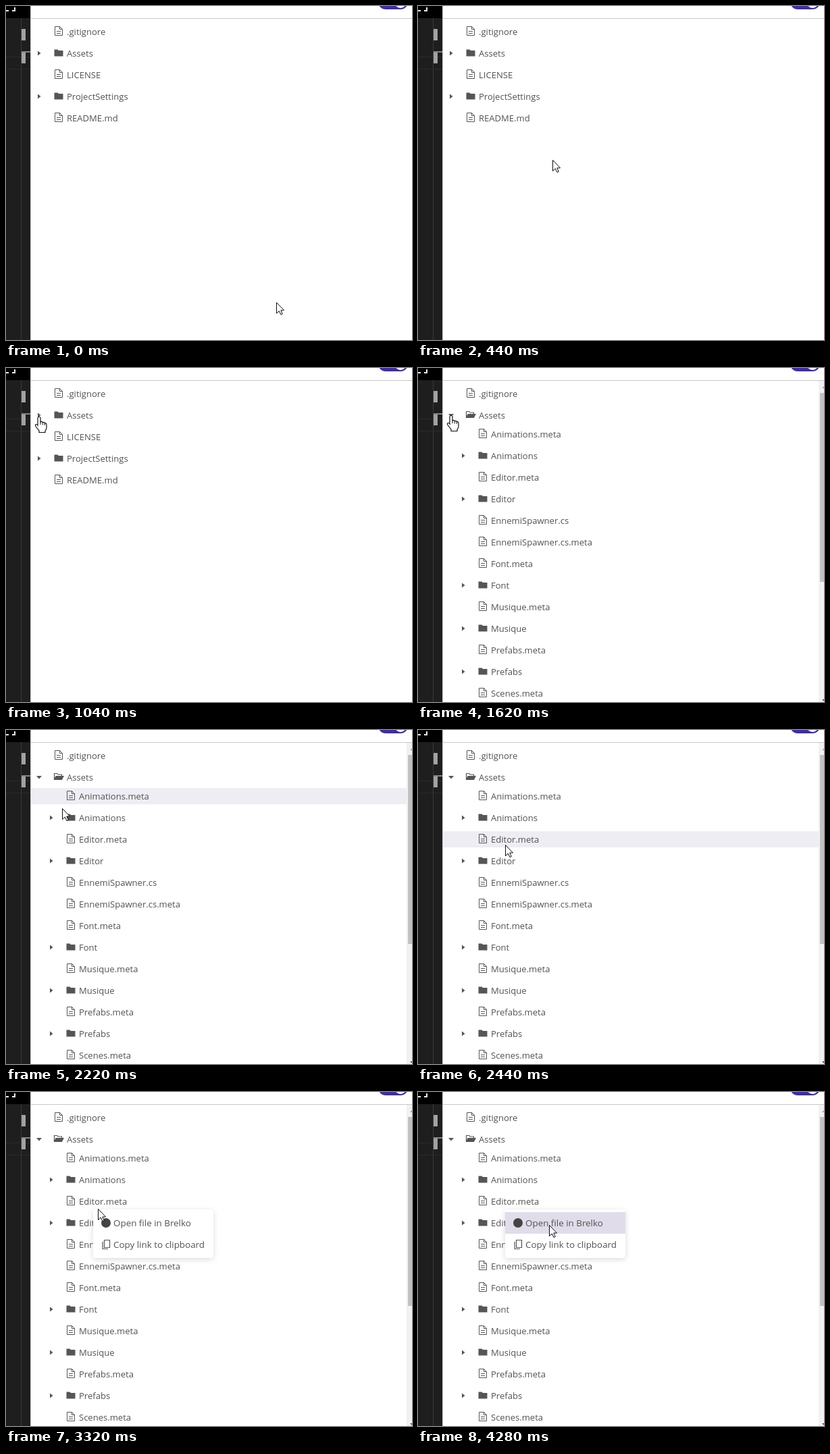
Animation, 601 px wide and 495 px high, one loop 4370 ms. Source, as an HTML page with a canvas:

```html
<!DOCTYPE html>
<html lang="en">
<head>
<meta charset="utf-8">
<title>File tree</title>
<style>
  html, body { margin: 0; width: 100%; height: 100%; overflow: hidden; background: #fff; }
  canvas { display: block; }
</style>
</head>
<body>
<canvas id="stage" width="601" height="495"></canvas>
<script>
const ctx = document.getElementById('stage').getContext('2d');
const LOOP = 4370;
const INK = '#525252', ICON = '#555';
const HOVER = '#eeedf4', ACTIVE = '#e1dcea';
const TREE_SIZE = 13.05, MENU_SIZE = 13.4;

const ROOT_REST = [['LICENSE', 102], ['ProjectSettings', 134, true], ['README.md', 166]];
const CHILDREN = [
  ['Animations.meta'], ['Animations', true], ['Editor.meta'], ['Editor', true],
  ['EnnemiSpawner.cs'], ['EnnemiSpawner.cs.meta'], ['Font.meta'], ['Font', true],
  ['Musique.meta'], ['Musique', true], ['Prefabs.meta'], ['Prefabs', true], ['Scenes.meta']
];

// Pointer moves: start, end, number of steps, target x and y.
const MOVES = [
  [80, 600, 8, 106, 130],
  [680, 900, 4, 49, 74],
  [1040, 1040, 1, 49, 72],
  [1120, 1120, 1, 49, 70],
  [2080, 2220, 3, 83, 116],
  [2290, 2360, 2, 120, 365],
  [2440, 2440, 1, 129, 170],
  [3320, 3320, 1, 136, 173],
  [3380, 3620, 4, 194, 197]
];
const CLICKS = [[1260, 1400], [2660, 2800], [4220, 4280]];

const clamp = v => Math.max(0, Math.min(1, v));
const ramp = (t, a, b) => clamp((t - a) / (b - a));
const within = (t, a, b) => t >= a && t < b;
const easeInOut = p => p * p * (3 - 2 * p);

function rect(x, y, w, h, color) {
  ctx.fillStyle = color;
  ctx.fillRect(x, y, w, h);
}

function disc(x, y, r, color) {
  ctx.fillStyle = color;
  ctx.beginPath();
  ctx.arc(x, y, r, 0, 7);
  ctx.fill();
}

function roundRect(x, y, w, h, r, color) {
  ctx.fillStyle = color;
  ctx.beginPath();
  ctx.roundRect(x, y, w, h, r);
  ctx.fill();
}

function polygon(points, color) {
  ctx.beginPath();
  points.forEach(([x, y]) => ctx.lineTo(x, y));
  ctx.closePath();
  ctx.fillStyle = color;
  ctx.fill();
}

function shape(path, x, y, fill, stroke, width = 1) {
  ctx.save();
  ctx.translate(x, y);
  const p = new Path2D(path);
  if (fill) { ctx.fillStyle = fill; ctx.fill(p); }
  if (stroke) { ctx.strokeStyle = stroke; ctx.lineWidth = width; ctx.stroke(p); }
  ctx.restore();
}

function label(text, x, y, size = TREE_SIZE) {
  ctx.font = `${size}px "Open Sans", "Noto Sans", sans-serif`;
  ctx.fillStyle = INK;
  ctx.fillText(text, x, y + 5);
}

function faded(alpha, draw) {
  if (alpha <= 0) return;
  ctx.save();
  ctx.globalAlpha *= alpha;
  draw();
  ctx.restore();
}

function bar(y, color, alpha, right = 601) {
  faded(alpha, () => rect(37, y - 12, right - 37, 24, color));
}

function fileIcon(x, y) {
  shape('M.5 -6.5H7.5L11.5 -2.5V6.5H.5ZM7.5 -6.5V-2.5H11.5M3 .5H9M3 3.5H9', x, y, null, ICON);
}

function folderIcon(x, y, open) {
  if (open) {
    shape('M.5 4.5V-4.5H4.5L6 -3H11.5V-.5M.5 4.5L3 -.5H14L11.5 4.5Z', x - 1, y, null, ICON, 1.2);
    shape('M.5 4.5L3 -.5H14L11.5 4.5Z', x - 1, y, ICON);
  } else {
    shape('M-.5 -4.5H4.5L6 -3H12.5V5.5H-.5Z', x, y, ICON);
  }
}

function caret(x, y, open) {
  polygon(open ? [[x - 4, y - 2], [x + 4, y - 2], [x, y + 2.5]]
               : [[x - 2, y - 3.5], [x + 2.5, y], [x - 2, y + 3.5]], ICON);
}

function row(name, x, y, folder, open, caretOpen = open) {
  if (folder) {
    caret(x - 23, y, caretOpen);
    folderIcon(x, y - 1, open);
  } else {
    fileIcon(x, y - 1);
  }
  label(name, x + 18, y);
}

function editorStrip() {
  rect(0, 0, 36, 495, '#1e1e1e');
  rect(0, 0, 36, 18, '#000');
  rect(22, 18, 1, 477, '#3a3a3a');
  rect(0, 75, 36, 1, '#2b2b2b');
  rect(0, 93, 36, 1, '#2b2b2b');
  rect(23, 34, 6, 17, '#a2a2a2');
  rect(23, 67, 6, 18, '#a2a2a2');
  rect(23, 67, 13, 2, '#858585');
  rect(36, 0, 1, 495, '#c8c8c8');
  rect(0, 6, 4, 2, '#eee');
  rect(9, 6, 5, 2, '#eee');
  rect(12, 2, 2, 6, '#eee');
}

function header() {
  rect(37, 18, 564, 1, '#c8c8c8');
  roundRect(551, -17, 44, 22, 11, '#3f2da5');
  disc(584, -6, 9, '#fff');
}

function scrollbar() {
  rect(593, 19, 8, 476, '#f1f1f1');
  rect(595, 37, 6, 280, '#c1c1c1');
  polygon([[598, 30], [601, 27], [601, 30]], '#a3a3a3');
  polygon([[598, 491], [601, 491], [601, 494]], '#505050');
}

function tree(t) {
  const expanded = t >= 1480;
  if (!expanded) {
    bar(134, '#fbfbfd', within(t, 600, 760) ? 1 : 0);
    bar(102, '#fbfbfd', within(t, 760, 900) ? 1 : 0);
  } else {
    bar(98, HOVER, within(t, 2160, 2300) ? 1 : 0, 593);
    bar(162, HOVER, within(t, 2440, 2800) ? 1 : 0, 593);
    bar(162, ACTIVE, t < 2800 ? 0 : t < 2880 ? 1 : t < 2960 ? .45 : 0, 593);
  }
  row('.gitignore', 72, 38);
  row('Assets', 72, 70, true, expanded, t >= 1580);
  if (!expanded) {
    ROOT_REST.forEach(([name, y, folder]) => row(name, 72, y, folder));
    return;
  }
  faded(t < 1580 ? 0 : t < 1620 ? .5 : 1, () =>
    CHILDREN.forEach(([name, folder], i) => row(name, 90, 98 + 32 * i, folder)));
  if (t >= 1580) scrollbar();
}

function menu(t) {
  if (t < 2800) return;
  const [alpha, scaleY] = t < 2880 ? [.25, .875] : t < 2960 ? [.75, .96] : [1, 1];
  faded(alpha, () => {
    ctx.translate(129, 174);
    ctx.scale(1, scaleY);
    ctx.save();
    ctx.shadowColor = 'rgba(0,0,0,.15)';
    ctx.shadowBlur = 8;
    ctx.shadowOffsetY = 2;
    roundRect(0, 0, 178, 72, 4, '#fff');
    ctx.restore();
    faded(ramp(t, 3400, 3700), () => rect(0, 4, 178, 32, ACTIVE));
    disc(19, 20, 7, '#444');
    label('Open file in Brelko', 30, 20, MENU_SIZE);
    shape('M3.5 -6.5H11.5V4.5H3.5ZM1 -4V6.5H9', 13, 52, null, ICON, 1.2);
    label('Copy link to clipboard', 30, 52, MENU_SIZE);
  });
}

function pointerAt(t) {
  let x = 400, y = 439;
  for (const [start, end, steps, toX, toY] of MOVES) {
    if (t < start) break;
    const done = end > start ? Math.floor(ramp(t, start, end) * (steps - 1) + 1.001) / steps : 1;
    const p = easeInOut(done);
    x += (toX - x) * p;
    y += (toY - y) * p;
  }
  return [Math.round(x), Math.round(y)];
}

function pointer(t) {
  const [x, y] = pointerAt(t);
  if (CLICKS.some(([a, b]) => within(t, a, b))) disc(x, y, 12, 'rgba(255,255,0,.47)');
  const hand = within(t, 600, 2080) || (within(t, 3380, 4280) && y >= 178);
  if (hand) {
    shape('M-2 13V2Q-2 .5 0 .5T2 2V8Q4 6.5 5.3 8.8Q7.3 7.5 8.3 9.8Q11 9 11 12V16Q11 19 9 21V23.5H0V21L-5 14.5Q-6.5 11.5 -4 11.5Q-3 11.5 -2 13Z', x, y, '#fff', '#111', 1.2);
    shape('M2 8V12M5.3 9V12.5M8.3 10V13', x, y, null, '#111');
  } else {
    shape('M.5 .5V16.5L4.3 13L7 18.5L9.3 17.5L6.8 12H11.5Z', x, y, '#fff', '#0c0c14');
  }
}

function frame(now) {
  const t = now % LOOP;
  rect(0, 0, 601, 495, '#fff');
  tree(t);
  header();
  editorStrip();
  menu(t);
  pointer(t);
  requestAnimationFrame(frame);
}
requestAnimationFrame(frame);
</script>
</body>
</html>
```
